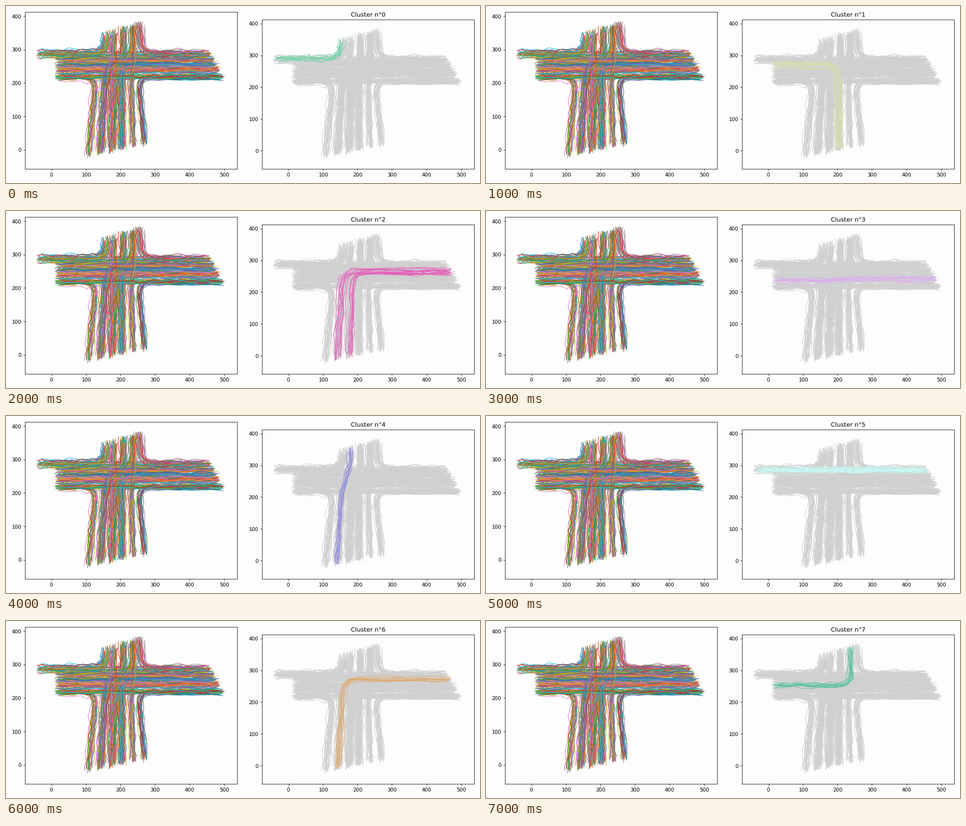
Write a matplotlib script that moves like this. It is 800 px wide and 300 px high and loops after 8 s.

```python
import numpy as np
import matplotlib.pyplot as plt
from matplotlib.animation import FuncAnimation
from matplotlib.collections import LineCollection

W, H, DPI = 800, 300, 62.5
GREY, PAPER = "#d0d0d0", "#fdfdfd"
CENTRE = 200
rng = np.random.default_rng(12)

# A route joins two lanes; a lane is an arm of the crossing and an index.
CLUSTERS = [
    ("#66d6a0", ["W0 N0"]),
    ("#d5e3a0", ["W1 S3"]),
    ("#e45cba", ["S1.1 E1.4", "S2.2 E1.4"]),
    ("#dfaaf0", ["W3 E2.7"]),
    ("#8f8be0", ["N1 S1"]),
    ("#c6f9f6", ["W0 E0", "W0.3 E0.3"]),
    ("#e0a868", ["E1 S1.2"]),
    ("#4cc295", ["W2 N3.2"]),
]
OTHERS = ["W4 S0", "W1 E1", "W2 E2", "W3 E3", "W4 E4", "E4 S5", "E0 N4",
          "W0 N0.3", "N1 S2.2", "N2 S3", "N3.2 S4", "N3 S1", "N2 S2", "E2 S3"]


def lane(name):
    """Outer tip of a lane and the elbow where it enters the crossing."""
    arm, i = name[0], float(name[1:])
    if arm in "WE":
        tip_x = -50 + 54 * min(i, 1) if arm == "W" else 470 + 9 * i
        tip = (tip_x, 287 - 17 * i)
        return tip, (CENTRE, tip[1])
    north = arm == "N"
    x = 158 + 24 * i if north else 108 + 32 * i
    tip_y = 360 + 8 * i if north else -30 + 7 * i
    bend = 0.15 if north else -0.25
    return (x, tip_y), (x + bend * (x - CENTRE), 290 if north else 220)


def route_points(route):
    a, b = route.split()
    (tip_a, in_a), (tip_b, in_b) = lane(a), lane(b)
    sides = [name[0] in "WE" for name in (a, b)]
    if sides[0] == sides[1]:
        return np.array([tip_a, in_a, in_b, tip_b])
    corner = (in_b[0], in_a[1]) if sides[0] else (in_a[0], in_b[1])
    return np.array([tip_a, corner, tip_b])


def make_path(route):
    """One noisy path along a route, with rounded bends and a side offset."""
    points = route_points(route)
    dist = np.r_[0, np.cumsum(np.hypot(*np.diff(points, axis=0).T))]
    t = np.linspace(rng.uniform(-5, 28), dist[-1] - rng.uniform(-5, 28), 17)
    near = t[:, None] + np.linspace(-35, 35, 9)
    xy = np.stack([np.interp(near, dist, p).mean(axis=1)
                   for p in points.T], axis=1)
    step = np.gradient(xy, axis=0)
    normal = np.c_[-step[:, 1], step[:, 0]] / np.hypot(*step.T)[:, None]
    return xy + rng.normal(0, 5.5) * normal + rng.normal(0, 2.8, xy.shape)


def make_paths(routes, count):
    return [make_path(route) for route in routes for _ in range(count)]


def make_axes(left, top):
    right, bottom = left + 358.3, 276
    box = [left / W, 1 - bottom / H, (right - left) / W, (bottom - top) / H]
    ax = fig.add_axes(box, facecolor=PAPER)
    ax.set(xlim=(-76.3, 538), ylim=(-57.4, 413.3),
           xticks=range(0, 501, 100), yticks=range(0, 401, 100))
    return ax


def add_lines(ax, paths, colors, width=1.0, z=2):
    lines = LineCollection(paths, colors=colors, linewidths=width,
                           joinstyle="round", zorder=z)
    return ax.add_collection(lines, autolim=False)


plt.rcParams.update({"font.family": "DejaVu Sans", "text.hinting": "none"})
fig = plt.figure(figsize=(W / DPI, H / DPI), dpi=DPI, facecolor=PAPER)
ax_all = make_axes(32, 9.8)
ax_one = make_axes(432, 22.7)

groups = [make_paths(routes, 10) for _, routes in CLUSTERS]
paths = sum(groups, []) + make_paths(OTHERS, 24)
mixed = [paths[i] for i in rng.permutation(len(paths))]

add_lines(ax_all, mixed, [f"C{i % 10}" for i in range(len(mixed))])
add_lines(ax_one, paths, GREY)
shown = add_lines(ax_one, [], GREY, 0.85, 2.2)
title = ax_one.set_title("")


def update(k):
    shown.set_segments(groups[k])
    shown.set_color(CLUSTERS[k][0])
    title.set_text(f"Cluster n°{k}")
    return shown, title


anim = FuncAnimation(fig, update, frames=len(CLUSTERS), interval=1000,
                     repeat=True, repeat_delay=0, blit=False)
plt.show()
```
